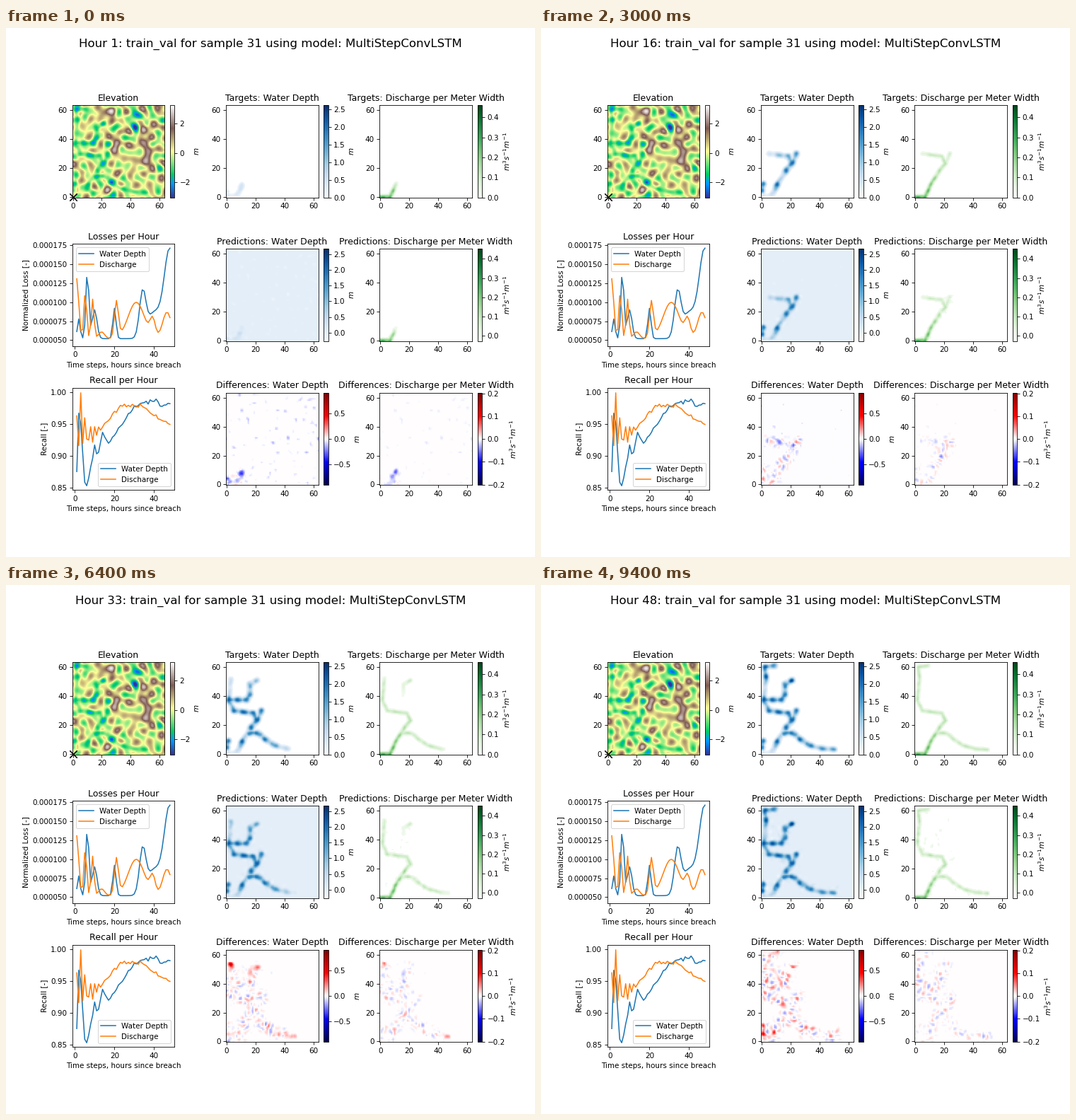
Recreate the animation shown at these times as a matplotlib script. Size 748 px wide and 748 px high, loop 9600 ms.

```python
import numpy as np
import matplotlib.pyplot as plt
from matplotlib.animation import FuncAnimation
from matplotlib.colors import ListedColormap
from mpl_toolkits.axes_grid1 import make_axes_locatable

plt.rcParams["font.family"] = "DejaVu Sans"

N = 64
HOURS = 48
Y, X = np.mgrid[0:N, 0:N].astype(float)
hours = np.arange(1, HOURS + 1)

# Water courses: first hour, last hour, hours of flow, bends where water pools
RIVERS = [
    (-7, 0, 99, [(0, 0), (7, 0), (10.5, 8)]),
    (0, 5, 99, [(10.5, 8), (17, 18.5), (21, 23)]),
    (5, 9, 14, [(21, 23), (24, 30)]),
    (0, 3, 0, [(0, 4), (1, 9)]),
    (10, 15, 99, [(21, 23), (18.5, 28), (12, 29), (5, 30)]),
    (16, 42, 99, [(5, 30), (1.5, 37), (3, 53), (2, 60), (9, 61)]),
    (18, 31, 10, [(1.5, 37), (8, 37.5), (14, 37.5), (16, 41), (16, 48), (21, 51)]),
    (17, 35, 99, [(15.5, 14.5), (22, 14.3), (27, 10), (33, 6), (42, 3.5), (50, 3)]),
]


def noise(seed, wavelength, spread=0.5):
    """Smooth random field with features of about one size."""
    f = np.fft.fftfreq(N)
    radius = np.hypot(*np.meshgrid(f, f)) * wavelength
    band = np.exp(-((radius - 1) / spread) ** 2)
    white = np.random.default_rng(seed).normal(size=(N, N))
    field = np.fft.ifft2(np.fft.fft2(white) * band).real
    return field / field.std()


def bell(distance, width):
    return np.exp(-(distance / width) ** 2 / 2)


def nearest(px, py):
    gap = np.hypot(X[..., None] - px, Y[..., None] - py)
    return gap.min(-1), gap.argmin(-1)


def survey(first, last, life, bends):
    """Depth, current and reach around a course, and when water arrives."""
    bx, by = np.array(bends, float).T
    along = np.r_[0, np.cumsum(np.hypot(np.diff(bx), np.diff(by)))]
    u = np.linspace(0, along[-1], 80)
    dist, index = nearest(np.interp(u, along, bx), np.interp(u, along, by))
    pool = bell(nearest(bx, by)[0], 2.2)
    arrival = first + index / 79 * (last - first)
    # Nothing ponds on the inflow edge; the current weakens downstream
    depth = (0.75 + 1.35 * pool) * bell(dist, 1.15 + 0.65 * pool) * np.tanh(Y / 3)
    force = 0.12 + 0.2 * np.exp(-np.clip(arrival + 3, 0, None) / 4)
    return depth, force * bell(dist, 0.95), bell(dist, 3), arrival, life


COURSES = [survey(*river) for river in RIVERS]
GRAIN = 1 + 0.12 * noise(4, 6)
WOBBLE = 0.5 * noise(5, 9)
DRIFT = [noise(seed, 6) for seed in (21, 22, 23, 24)]
PUDDLES = np.clip(noise(9, 8) - 0.9, 0, None)


def flood(hour, modelled=False):
    depth, flow, reach = np.zeros((3, N, N))
    for pond, current, near, arrival, life in COURSES:
        if modelled:  # late at first, ahead of the water later on
            arrival = arrival + 1.3 - 0.07 * arrival + WOBBLE
        age = np.clip(hour - arrival, 0, None)
        ebb = np.clip((life - age) / 8, 0, 1)
        depth = np.maximum(depth, pond * (1 - np.exp(-age / 3.5)))
        flow = np.maximum(flow, current * (1 - np.exp(-age / 1.2)) * ebb)
        reach = np.maximum(reach, near * (1 - np.exp(-age / 2)))
    return (np.clip(depth * GRAIN - 0.07, 0, 2.6),
            np.clip(flow * GRAIN - 0.008, 0, 0.45), reach)


def mottle(a, b, hour, fresh):
    """Patchy field that turns over with the hours; mostly zero."""
    field = 0.7 * (a * np.cos(hour) + b * np.sin(hour) + fresh)
    return np.sign(field) * np.clip(np.abs(field) - 0.6, 0, None)


def state(hour):
    depth, flow, reach = flood(hour)
    depth_guess, flow_guess, _ = flood(hour, modelled=True)
    fresh = noise(100 + hour, 5)
    specks = np.clip(noise(300 + hour, 6) - 1.35 - 0.06 * hour, 0, None)
    late = np.clip((hour - 28) / 20, 0, 1)

    err_d = (0.7 * (depth_guess - depth) - 0.09 * specks
             + reach * (0.11 * mottle(*DRIFT[:2], hour, fresh)
                        + 0.3 * late * PUDDLES))
    err_q = (0.7 * (flow_guess - flow) - 0.007 * specks
             + reach * 0.018 * mottle(*DRIFT[2:], hour, -fresh))
    err_d[np.abs(err_d) < 0.015] = 0
    err_q[np.abs(err_q) < 0.003] = 0
    return (depth, flow, depth + err_d, np.clip(flow + err_q, 0, None) - 0.03,
            err_d, err_q)


def elevation():
    depth, _, reach = flood(100)
    land = 0.2 + 0.85 * noise(8, 9, 0.3) * (1 - 0.6 * reach) - 0.95 * depth
    for x, y in [(23, 58), (30, 35), (50, 45), (50, 34), (50, 24)]:
        land += 2.2 * bell(X - x, 2.2) * bell(Y - y, 3)
    for y in (49, 57):
        land -= 2.2 * bell(X - 43, 2.4) * bell(Y - y, 2.4)
    return np.clip(land, -3.05, 3.25)


def peaks(base, *bumps):
    return base + sum(size * bell(hours - at, width) for at, width, size in bumps)


loss_depth = 1e-6 * peaks(52, (2, 0.7, 26), (6.35, 0.75, 90), (10, 1.2, 38),
                          (20, 0.8, 40), (34.2, 1.6, 57), (40, 3.5, 34),
                          (47.9, 2.8, 117))
loss_flow = 1e-6 * peaks(52, (1, 1, 79), (5.3, 0.7, 62), (9, 0.7, 52),
                         (13.5, 1.5, 9), (21, 1, 48), (31, 4.1, 48),
                         (39.3, 1.3, 23), (46.5, 2.2, 35))

jitter = 0.0015 * np.random.default_rng(3).normal(size=(2, HOURS))
recall_depth = jitter[0] + np.interp(
    hours, [1, 2, 3, 5, 6, 10, 11.5, 14, 17, 30, 36, 41, 43, 48],
    [0.872, 0.971, 0.95, 0.859, 0.853, 0.912, 0.898, 0.938, 0.919, 0.977,
     0.985, 0.989, 0.979, 0.981])
swing = 0.042 * np.exp(-(hours / 9) ** 2) * np.cos(2 * np.pi * (hours - 3) / 2.35)
recall_flow = jitter[1] + swing + np.interp(
    hours, [1, 3, 6, 13, 23, 33, 45, 48],
    [0.938, 0.962, 0.93, 0.943, 0.979, 0.979, 0.954, 0.952])

fig, axes = plt.subplots(3, 3, figsize=(10, 10), dpi=74.8)
fig.subplots_adjust(left=0.125, right=0.9, bottom=0.11, top=0.88,
                    wspace=0.5, hspace=0.2)
heading = fig.suptitle("", fontsize=16)


def from_white(name):
    colors = plt.get_cmap(name)(np.linspace(0, 1, 256))
    colors[:6] = 1
    return ListedColormap(colors)


def panel(ax, data, title, unit, cmap, low, high, ticks):
    image = ax.imshow(data, origin="lower", cmap=cmap, vmin=low, vmax=high)
    ax.set_title(title)
    ax.set_xticks([0, 20, 40, 60])
    ax.set_yticks([0, 20, 40, 60])
    side = make_axes_locatable(ax).append_axes("right", size="5%", pad=0.1)
    fig.colorbar(image, cax=side, ticks=ticks).set_label(unit)
    return image


def chart(ax, depth, flow, title, label, ticks, limits, corner):
    ax.plot(hours, depth, label="Water Depth")
    ax.plot(hours, flow, label="Discharge")
    ax.set_title(title)
    ax.set_xlabel("Time steps, hours since breach")
    ax.set_ylabel(label)
    ax.set_xticks([0, 20, 40])
    ax.set_yticks(ticks)
    ax.set_ylim(limits)
    ax.set_box_aspect(1)
    ax.legend(loc=corner)


panel(axes[0, 0], elevation(), "Elevation", "$m$", "terrain",
      -3.05, 3.25, [-2, 0, 2])
axes[0, 0].scatter(0, 0, s=100, marker="x", color="black",
                   clip_on=False, zorder=5)
axes[0, 0].set_xlim(-0.5, N - 0.5)
axes[0, 0].set_ylim(-0.5, N - 0.5)
chart(axes[1, 0], loss_depth, loss_flow, "Losses per Hour",
      "Normalized Loss [-]", np.arange(50, 176, 25) * 1e-6,
      (41.8e-6, 177e-6), "upper left")
chart(axes[2, 0], recall_depth, recall_flow, "Recall per Hour",
      "Recall [-]", [0.85, 0.9, 0.95, 1.0], (0.8457, 1.0074), "lower right")

tenths = np.arange(-2, 5) / 10
halves = np.arange(-1, 6) / 2
blues, greens = from_white("Blues"), from_white("Greens")
looks = [
    ("Targets", blues, (0, 2.62), greens, (0, 0.46)),
    ("Predictions", blues, (-0.28, 2.665), greens, (-0.03, 0.452)),
    ("Differences", "seismic", (-0.91, 0.91), "seismic", (-0.203, 0.203)),
]


def within(ticks, limits):
    return [t for t in ticks if limits[0] <= t <= limits[1]]


blank = np.zeros((N, N))
images = []
for row, (name, map_d, span_d, map_q, span_q) in zip(axes, looks):
    images.append(panel(row[1], blank, name + ": Water Depth", "$m$",
                        map_d, *span_d, within(halves, span_d)))
    images.append(panel(row[2], blank, name + ": Discharge per Meter Width",
                        "$m^3s^{-1}m^{-1}$",
                        map_q, *span_q, within(tenths, span_q)))


def update(frame):
    hour = frame + 1
    heading.set_text(f"Hour {hour}: train_val for sample 31 "
                     "using model: MultiStepConvLSTM")
    for image, data in zip(images, state(hour)):
        image.set_data(data)
    return [heading, *images]


anim = FuncAnimation(fig, update, frames=HOURS, interval=200, repeat=True)
plt.show()
```
